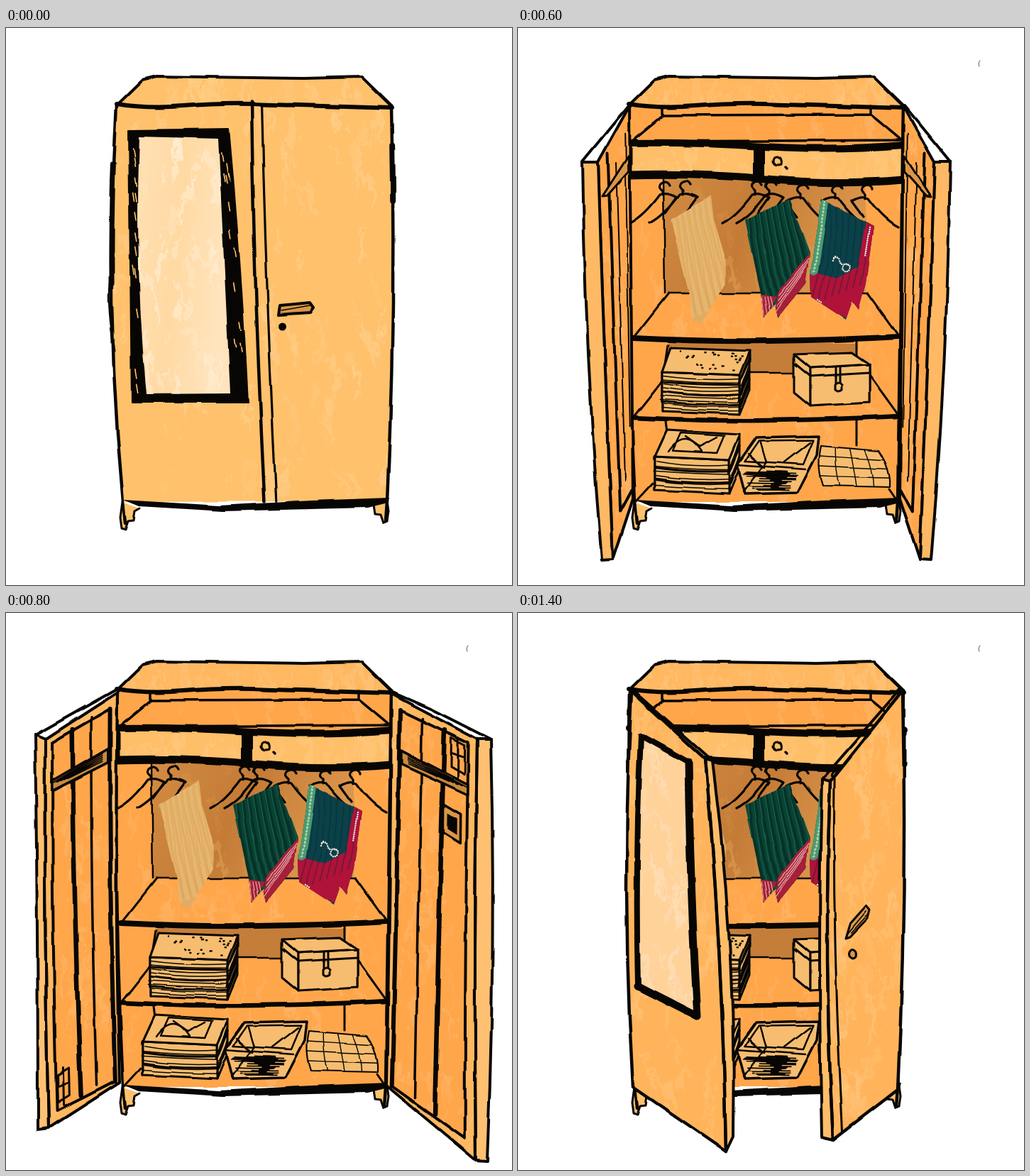
These frames come from a looping animation (713x785 px, 1.5 s). An HTML page:

```html
<!DOCTYPE html>
<html lang="en">
<head>
<meta charset="utf-8">
<title>Wardrobe</title>
<style>
  html, body { margin: 0; width: 100%; height: 100%; overflow: hidden; background: #fff; }
  svg { display: block; width: 713px; height: 785px; }
</style>
</head>
<body>
<svg id="stage" viewBox="0 0 713 785" stroke="#080604" stroke-linecap="round" stroke-linejoin="round"></svg>
<script>
const INK = '#080604', TAN = '#f6bd70', BRASS = '#d99749';
const PALE = ['#ffc16c', '#ffd08d'], WARM = ['#ffb45b', '#ffc57c'], DEEP = ['#ffa64b', '#ffb76a'];

let seed = 11, clipCount = 0;
const rand = (a, b) => {
  seed = (seed * 16807) % 2147483647;
  return a + (b - a) * seed / 2147483647;
};
const times = (n, f) => Array.from({ length: n }, (_, i) => f(i)).join('');

const ink = (w, d, c = INK) => `<path d="${d}" fill="none" stroke="${c}" stroke-width="${w}"/>`;
const fill = (c, d) => `<path d="${d}" fill="${c}" stroke="none"/>`;
const shape = (c, w, d) => `<path d="${d}" fill="${c}" stroke-width="${w}"/>`;
const rough = s => `<g filter="url(#wobble)">${s}</g>`;
const clipped = (d, s) => {
  const id = 'clip' + clipCount++;
  return `<clipPath id="${id}"><path d="${d}"/></clipPath><g clip-path="url(#${id})">${s}</g>`;
};

// A quad has corners in clockwise order from the top left; its two sides may bow sideways.
const mix = (a, b, t) => a + (b - a) * t;
const quad = (corners, bow = [0, 0]) => ({ corners, bow });
const flip = ({ corners, bow }) => quad(corners.map(([x, y]) => [700 - x, y]), bow.map(b => -b));
function at({ corners: [tl, tr, br, bl], bow }, u, v) {
  const [x, y] = [0, 1].map(k => mix(mix(tl[k], tr[k], u), mix(bl[k], br[k], u), v));
  return [x + mix(...bow, u) * 4 * v * (1 - v), y];
}
const path = pts => 'M' + pts.map(p => p.map(n => n.toFixed(1)).join(' ')).join('L');
const run = (q, u0, v0, u1, v1) =>
  [0, .17, .33, .5, .67, .83, 1].map(t => at(q, mix(u0, u1, t), mix(v0, v1, t)));
const rail = (...args) => path(run(...args));
const patch = (q, u0 = 0, v0 = 0, u1 = 1, v1 = 1) =>
  path([...run(q, u0, v0, u0, v1), ...run(q, u1, v1, u1, v0)]) + 'Z';

// Flat colour with dry-brush streaks.
function wood(q, [base, light], n) {
  const streaks = times(n, () => {
    const [x, y] = at(q, rand(0, 1), rand(-.05, .95)), dx = rand(-18, 18), dy = rand(20, 60);
    return `<path d="M${x} ${y}q${dx} ${dy / 3} ${dx} ${dy}" fill="none" stroke="${light}"
      stroke-width="${rand(1, 11)}" opacity="${rand(.25, .6)}"/>`;
  });
  return fill(base, patch(q)) + clipped(patch(q), `<g filter="url(#brush)">${streaks}</g>`);
}

const crown = quad([[194, 70], [501, 70], [541, 111], [158, 109]]);
const foot = shape(PALE[0], 3, 'M164 668 161 690 163 705 168 707 172 695 180 694 182 681 189 677');
const feet = foot + `<g transform="matrix(-1 0 0 1 700 -9)">${foot}</g>`;
const base = fill(INK, 'M166 665 300 673 430 666 540 662 538 669 510 676 305 681 188 674Z');
const crownInk = ink(4, 'M157 107 192 73 212 68 420 71 501 69 542 109') +
  ink(6, 'M155 107Q200 114 250 110T345 107T544 113');
const sides = q => ink(4.5, rail(q, 0, 0, 0, 1) + 'l3 30' + rail(q, 1, 0, 1, 1) + 'l-2 28');

function shut() {
  const body = quad([[155, 108], [543, 110], [537, 667], [165, 668]], [-11, 5]);
  const frame = quad([[173, 144], [314, 142], [341, 527], [177, 527]], [0, 2]);
  const glass = quad([[188, 153], [299, 156], [316, 515], [198, 516]], [-6, 0]);
  const flecks = times(26, i => path([at(frame, i % 2 ? rand(.9, .97) : rand(.02, .06), rand(.05, .95))]) + 'l2 12');
  return feet + wood(crown, PALE, 35) + wood(body, PALE, 130) +
    shape(INK, 2, patch(frame)) + ink(1.6, flecks, PALE[0]) + wood(glass, ['url(#glass)', '#fff0d8'], 40) +
    base + crownInk + sides(body) +
    ink(8, rail(body, 0, .15, 0, .45) + rail(body, 1, .1, 1, .24)) + ink(3, 'M146 360Q143 395 153 456') +
    ink(4.5, rail(body, .492, -.01, .536, 1)) + ink(3.2, rail(body, .53, 0, .58, 1)) +
    shape(BRASS, 4, 'M384 404 386 391 428 387 433 394 428 401Z') + ink(1.5, 'M388 398 428 391') +
    `<circle cx="389.500" cy="420" r="5.500" fill="${INK}" stroke="none"/>`;
}

// The long arm of a hanger slopes down towards the side it faces.
const hanger = (x, y, side) => `M${x} ${y + 14}v-6q-8 -6 -2 -11q8 -5 12 3` +
  `M${x + side * 46} ${y + 54}q${-side * 20} -10 ${-side * 42} -40q${-side * 10} -4 ${-side * 24} 4l${side * 16} 22`;

function clothes() {
  const cream = 'M215 270 272 236 276 270 291 320 292 360 258 417 246 412 240 370Z';
  const green = 'M320 270 383 241 411 318 405 360 366 408 362 390 346 407 342 375Z';
  const teal = 'M427 241 460 258 501 280 490 360 480 397 471 385 462 411 413 379 412 345Z';
  const folds = (x, y, lean) => times(10, i => `M${x + i * 8} ${y - i * 4}q${6 + i} 60 ${lean + i * 2} 140`);
  const stripes = times(4, i => `M${412 - i * 3} ${322 + i * 7}L${367 - i} ${378 + i * 7}M${343 + i * 4} 380l${3 + i} 24`);
  return fill('#e0ac64', cream) + clipped(cream, ink(6, folds(220, 266, 26), '#edbf7b88') + ink(1.2, folds(222, 266, 18), '#c98a4355')) +
    fill('#0a4234', green) + clipped(green,
      ink(3.5, folds(326, 268, 26), '#06302a') + ink(1, folds(324, 268, 20), '#1b6a4c') +
      fill('#a51f39', 'M412 316 365 374 360 412 408 370ZM338 376 364 380 346 412Z') + ink(1.3, stripes, '#dda2a0')) +
    fill('#0b4148', teal) + clipped(teal,
      fill('#b01239', 'M410 342 450 352 478 338 490 272 510 280 480 415 405 385Z') +
      ink(2, folds(432, 250, -20), '#06263355') + ink(11, 'M432 240Q426 290 417 343', '#4a9a72') +
      `<g stroke-dasharray="1 4">${ink(3, 'M432 244Q426 290 417 343', '#a9d3a5')}</g>` +
      `<g stroke-dasharray="0 3">${ink(2.6, 'M444 327q2 -9 9 -2q0 8 8 8q9 0 6 8q-7 6 -10 -3q3 -10 11 -2M422 383l7 5M495 282l-6 40', '#eadfd8')}</g>`);
}

// A box seen from above: sides first, then front, then top.
function block(top, h, w = 3) {
  const [tl, tr, br, bl] = top.corners;
  const down = ([x, y]) => [x, y + h];
  return [[tl, bl], [tr, br], [bl, br]].map(([a, b]) => shape(TAN, w, path([a, b, down(b), down(a)]) + 'Z')).join('') +
    shape(TAN, w, patch(top));
}
function stack(top, h, folds) {
  const [, tr, br, bl] = top.corners;
  const lines = (n, w) => ink(w, times(n, i => {
    const y = h * (i + 1) / (n + 1), j = rand(-3, 3);
    return `M${bl[0] + j} ${bl[1] + y}Q${mix(bl[0], br[0], .5)} ${bl[1] + y + 6 + j} ${br[0] + j} ${br[1] + y}L${tr[0]} ${tr[1] + y + j}`;
  }));
  return block(top, h) + lines(folds, 3.2) + lines(folds * 3, 1.5);
}

function linens() {
  const cloths = quad([[215, 451], [326, 455], [312, 489], [203, 485]]);
  const papers = quad([[210, 567], [312, 573], [297, 609], [193, 604]]);
  const chest = quad([[389, 460], [470, 457], [495, 474], [412, 479]]);
  const rim = quad([[336, 577], [424, 575], [405, 622], [309, 615]]);
  const weave = quad([[312, 622], [408, 626], [388, 652], [322, 652]]);
  const quilt = quad([[427, 589], [508, 596], [524, 647], [430, 645]], [-4, 5]);
  const dots = times(26, () => path([at(cloths, rand(.1, .95), rand(.1, .85))]) + 'h1');
  const dashes = times(18, i => rail(weave, rand(.05, .6), (i + .5) / 18, rand(.65, .95), (i + .5) / 18));
  const seams = times(3, i => rail(quilt, (i + 1) / 4, 0, (i + 1) / 4, 1) + rail(quilt, 0, (i + 1) / 4, 1, (i + 1) / 4));
  return stack(cloths, 55, 3) + ink(2.5, dots) +
    stack(papers, 47, 2) + ink(2.5, patch(papers, .2, .08, .8, .75) + 'M212 597q24 -34 46 0M236 576 256 590 280 577') +
    block(chest, 54) + ink(3, 'M389 472 412 491 495 486M448 478v22M454 478v22') + shape(TAN, 3, 'M447 502q5 -6 10 0v7q-5 4 -10 0Z') +
    shape(TAN, 3.5, 'M309 615 336 577 424 575 421 602 394 655 320 657Z') +
    ink(2.5, patch(rim, .08, .12, .94, .86) + rail(rim, 0, 1, 1, 1) + 'M342 584 350 612 318 654M325 600 347 620M376 612 412 584') +
    ink(1.7, clipped ? dashes : '') + shape(TAN, 2.2, patch(quilt)) + ink(1.4, seams);
}

function shelf(y, back, w) {
  const top = quad([[212, back], [493, back], [537, y - 2], [162, y]]);
  return wood(top, DEEP, 20) + ink(2.5, rail(top, 0, 0, 1, 0)) + ink(3, rail(top, 0, 0, 0, 1) + rail(top, 1, 0, 1, 1)) +
    ink(w, `M162 ${y}q95 5 190 4t184 -6`);
}

function interior() {
  const body = quad([[157, 108], [543, 110], [535, 668], [165, 668]], [-5, 0]);
  const backdrop = quad([[205, 212], [490, 212], [490, 376], [207, 374]]);
  const drawers = quad([[157, 164], [543, 165], [543, 213], [157, 208]]);
  const ceiling = quad([[205, 123], [497, 122], [540, 158], [160, 160]]);
  return feet + wood(crown, ['#ffb760', '#ffc67c'], 40) + wood(body, DEEP, 90) +
    wood(backdrop, ['url(#back)', '#d99650'], 25) + fill('#c57e39', 'M212 444H477V486H212Z') +
    ink(2.5, rail(backdrop, 0, 0, 0, 1)) + ink(3, 'M207 474 211 447M477 441V472M208 554 210 572M477 552V588M167 667 190 642M523 650 534 666') +
    shelf(437, 374, 8) + shelf(549, 486, 6.5) +
    ink(3.5, patch(ceiling) + 'M203 113V122M497 110V122') + wood(drawers, ['#ffbe68', '#ffca82'], 40) +
    ink(10, 'M157 162Q250 161 345 167T544 165') + ink(11, 'M158 207Q250 204 350 213T542 214') +
    ink(16, 'M340 170V208') + ink(7, 'M157 165V206M544 168V212') +
    shape('#ffbe68', 3, 'M359 189q0 -8 6 -7q7 3 5 11q-8 3 -11 -4') + ink(3.5, 'M376 197l2 2') +
    ink(3.2, [204, 232, 334, 354].map(x => hanger(x, 221, -1)).join('') + [398, 447, 490].map(x => hanger(x, 226, 1)).join('')) +
    clothes() + linens() + base + crownInk + sides(body) + ink(1.2, 'M650 54q-2 -4 1 -8', '#777');
}

function ajar() {
  const left = quad([[160, 110], [264, 206], [293, 758], [162, 668]], [-8, 5]);
  const leftEdge = quad([[264, 206], [274, 209], [303, 737], [293, 758]], [5, 10]);
  const glass = quad([[173, 173], [240, 210], [253, 569], [169, 526]], [-3, -2]);
  const right = quad([[440, 237], [542, 110], [535, 672], [444, 742]], [-6, 5]);
  const rightEdge = quad([[428, 234], [440, 237], [444, 742], [428, 738]], [-3, -6]);
  return wood(left, WARM, 75) + wood(right, WARM, 75) + wood(glass, ['#ffd29a', '#ffe2c0'], 30) +
    [leftEdge, rightEdge].map(q => shape('#ffbd69', 4, patch(q))).join('') +
    ink(4.5, patch(left) + patch(right)) + ink(4, 'M166 112 274 208M538 108 428 234') +
    ink(8, patch(glass)) + ink(11, rail(glass, 1, 0, 1, 1) + rail(glass, 0, 1, 1, 1)) +
    ink(3, rail(right, .06, 0, .15, 1)) +
    shape(BRASS, 3, 'M462 458 468 438 491 412 496 418 493 430 468 456Z') + ink(1.7, 'M465 451 491 420M470 450 494 424') +
    shape(BRASS, 3, 'M467 478q4 -7 9 0q2 9 -5 9q-6 -3 -4 -9Z');
}

// Inner side of a door: u runs from its free edge to the hinge.
function leaf(face, edge, plate) {
  const line = (w, ...args) => ink(w, rail(face, ...args));
  const bar = path([at(face, .1, .12), at(face, .88, .13), at(face, .88, .165), at(face, .1, .145)]) + 'Z';
  const hatch = times(5, i => rail(face, .12 + i * .05, .127 + i * .003, .8, .133 + i * .005));
  return wood(face, ['#ffb760', '#ffc67c'], 40) +
    wood(quad([at(face, .1, .02), at(face, .9, .03), at(face, .94, .99), at(face, .12, .97)]), DEEP, 45) +
    shape('#ffc072', 4, patch(edge)) + ink(4, patch(face) + plate) +
    ink(4, rail(face, .1, .02, .12, .97) + rail(face, .1, .02, .9, .03) + rail(face, .12, .97, .94, .99)) +
    line(6, .9, .03, .94, .99) + line(6.5, .38, .02, .46, .97) + line(3.5, .64, .02, .68, .97) +
    shape('#c98a40', 3.5, bar) + ink(1.8, hatch);
}

function half() {
  const face = quad([[113, 189], [157, 110], [162, 664], [134, 749]], [-1, 0]);
  const edge = quad([[91, 189], [113, 189], [134, 749], [118, 750]], [-5, -1]);
  const plate = 'M155 110 91 188';
  const panel = q => wood(q, DEEP, 45) + ink(4, patch(q)) +
    ink(4, rail(q, .3, .02, .4, .94) + rail(q, .4, .94, .95, .97)) + ink(2, rail(q, .55, .08, .65, .9) + rail(q, .86, .05, .9, .8)) +
    shape(BRASS, 3, path([at(q, .1, .1), at(q, .95, .12), at(q, .95, .16), at(q, .25, .12)]) + 'Z');
  const side = (f, e) => panel(f) + shape('#ffb964', 4, patch(e));
  return side(face, edge) + side(flip(face), flip(edge)) + ink(4, plate + 'M545 110 609 188');
}

function open() {
  const left = quad([[55, 178], [157, 112], [160, 662], [60, 726]], [-2, -3]);
  const leftEdge = quad([[41, 172], [55, 178], [60, 726], [45, 728]], [1, -2]);
  const right = quad([[664, 178], [543, 114], [536, 666], [662, 771]], [-2, 1]);
  const rightEdge = quad([[683, 178], [664, 178], [662, 771], [678, 772]], [5, -2]);
  const latch = (q, v) => ink(3, patch(q, .14, v, .3, v + .07) + rail(q, .22, v - .01, .22, v + .09) + rail(q, .16, v + .03, .28, v + .035));
  return leaf(left, leftEdge, 'M41 172 155 108') + latch(left, .88) +
    leaf(right, rightEdge, 'M683 178 600 136 545 112') + latch(right, .03) +
    shape('#dc9645', 3.5, patch(right, .18, .2, .38, .27)) + fill(INK, patch(right, .22, .215, .33, .255));
}

const noise = (id, freq, octaves, scale) => `<filter id="${id}" filterUnits="userSpaceOnUse"
    x="0" y="0" width="713" height="785" color-interpolation-filters="sRGB">
  <feTurbulence type="fractalNoise" baseFrequency="${freq}" numOctaves="${octaves}" seed="4"/>
  <feDisplacementMap in="SourceGraphic" scale="${scale}" xChannelSelector="R" yChannelSelector="G"/></filter>`;
const gradient = (id, ...colours) => `<linearGradient id="${id}" x2="1" y2=".3">` +
  colours.map((c, i) => `<stop offset="${i / 2}" stop-color="${c}"/>`).join('') + '</linearGradient>';
const defs = noise('wobble', .025, 1, 5) + noise('brush', '.09 .05', 3, 30) +
  gradient('glass', '#ffe0b3', '#ffd9a2', '#ffe4bd') + gradient('back', '#d28b42', '#c37b36', '#dd974d');

const layers = { inside: interior(), shut: shut(), ajar: ajar(), half: half(), open: open() };
const stage = document.getElementById('stage');
stage.innerHTML = `<defs>${defs}</defs>` +
  Object.entries(layers).map(([id, s]) => `<g id="${id}">${rough(s)}</g>`).join('');

const LOOP = 1500;
const timeline = [[500, 'shut'], [600, 'ajar'], [800, 'half'], [1300, 'open'], [1400, 'half'], [LOOP, 'ajar']];
const start = performance.now();
let shown = '';

function draw(ms) {
  const pose = timeline.find(([end]) => ms < end)[1];
  if (pose === shown) return;
  shown = pose;
  for (const id in layers) {
    const visible = id === pose || (id === 'inside' && pose !== 'shut');
    document.getElementById(id).style.display = visible ? '' : 'none';
  }
}

function tick() {
  draw((performance.now() - start) % LOOP);
  requestAnimationFrame(tick);
}
tick();
</script>
</body>
</html>
```
